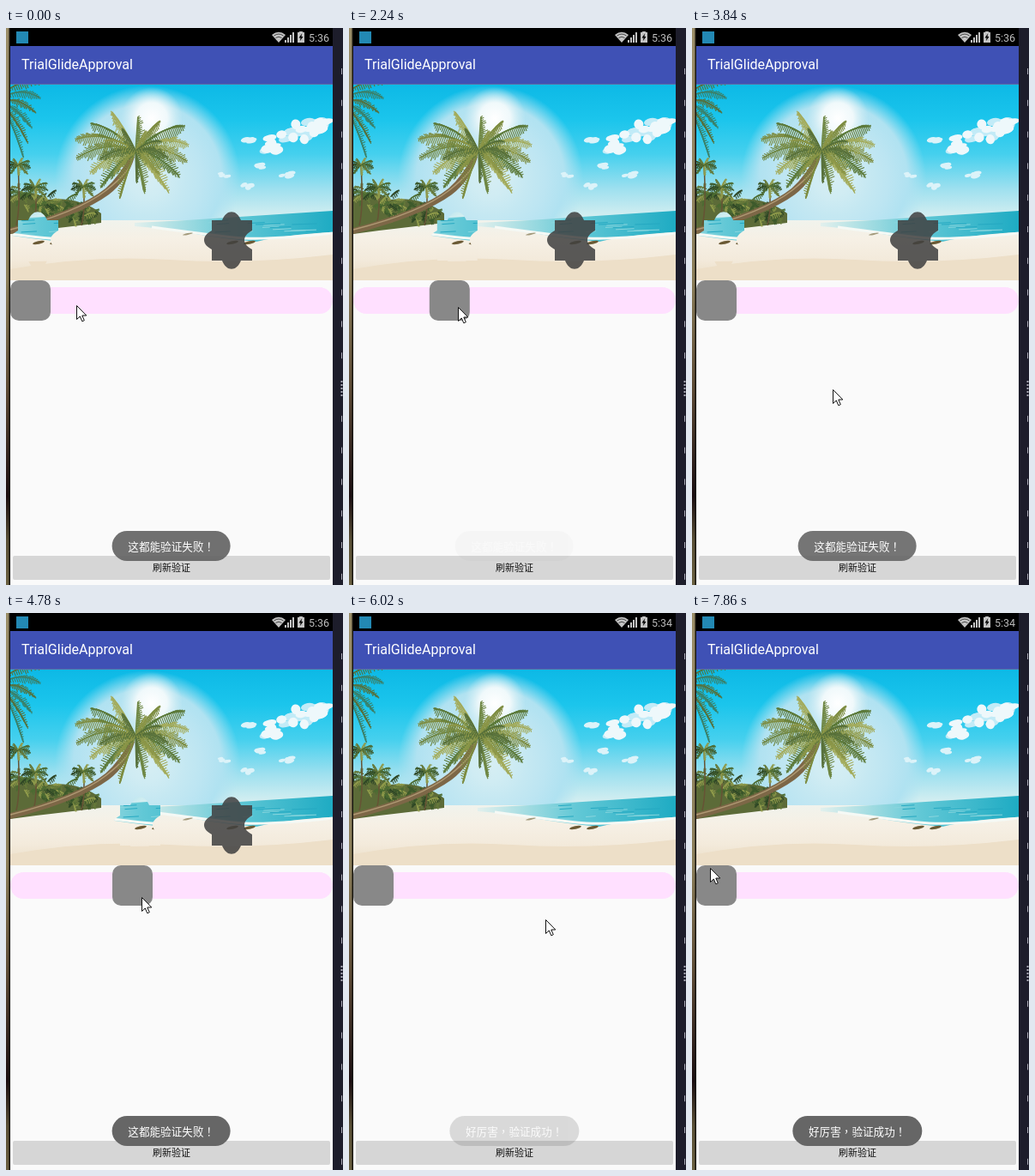
These frames come from a looping animation (393x649 px, 8000 ms). An HTML page with a canvas:

```html
<!DOCTYPE html>
<html lang="zh-CN">
<head>
<meta charset="utf-8">
<title>Slide check</title>
<style>
html, body { margin: 0; width: 100%; height: 100%; overflow: hidden; background: #1d1d2b; }
#stage { position: relative; width: 393px; height: 649px; overflow: hidden; font-family: Roboto, "Noto Sans CJK SC", "Noto Sans CJK", sans-serif; }
#stage > * { position: absolute; }
#edge { left: 0; top: 0; width: 5px; height: 649px; background: linear-gradient(90deg, transparent 3px, #16140f 4px), linear-gradient(#9b8e68, #8b7e59 45%, #5c4a35 65%, #1a0d10 84%, #5a5036 92%, #6a6040); }
#phone { left: 5px; top: 0; width: 376px; height: 649px; background: #fafafa; }
#status { left: 5px; top: 0; width: 376px; height: 21px; background: #000; }
#bar { left: 5px; top: 21px; width: 376px; height: 45px; background: linear-gradient(#3f51b5 44px, #5e6ba5 44px); }
#title { left: 18px; top: 33px; font-size: 16px; line-height: 20px; color: #fff; white-space: nowrap; }
#clock { right: 16px; top: 4px; font-size: 12.5px; line-height: 16px; color: #bdbdbd; }
#app { left: 12px; top: 4px; width: 14px; height: 14px; background: #2389b4; }
#photo { left: 5px; top: 66px; }
#track { left: 5px; top: 302px; width: 376px; height: 31px; border-radius: 15.5px; background: #ffe0ff; }
#knob { left: 5px; top: 294px; width: 47px; height: 47px; border-radius: 10px; background: #888; }
#button { left: 8px; top: 615px; width: 370px; height: 28px; border-radius: 2px; background: #d6d6d6; color: #111; font-size: 11px; line-height: 29px; text-align: center; }
#toast { left: 192.7px; top: 586px; height: 35px; padding: 0 19px; border-radius: 17.5px; background: #666; color: #fff; font-family: "Noto Sans CJK TC", "Noto Sans CJK", sans-serif; font-size: 12.6px; line-height: 36px; white-space: nowrap; transform: translateX(-50%); }
#icons, #margin, #pointer { left: 0; top: 0; }
</style>
</head>
<body>
<div id="stage">
  <div id="edge"></div>
  <div id="phone"></div>
  <div id="status"></div>
  <div id="app"></div>
  <svg id="icons" width="393" height="22" fill="#c4c4c4">
    <path d="M318 17L310 8Q318 1.500 326 8Z"/>
    <path d="M312.500 9Q318 5 323.500 9M314.500 11.500Q318 9 321.500 11.500" fill="none" stroke="#222" stroke-width=".8"/>
    <path d="M325 17V14H327V17ZM328 17V11H330V17ZM331 17V8H333V17ZM334 17V5H336V17Z"/>
    <path d="M340 5H342V4H346V5H348V17H340Z"/>
    <path d="M345 6.500L341.500 11.500H343.500L343 15L346.500 10H344.500Z" fill="#000"/>
  </svg>
  <div id="clock"></div>
  <div id="bar"></div>
  <div id="title">TrialGlideApproval</div>
  <canvas id="photo" width="376" height="228"></canvas>
  <div id="track"></div>
  <div id="knob"></div>
  <div id="button">刷新验证</div>
  <div id="toast" lang="zh-TW"></div>
  <svg id="margin" width="393" height="649"></svg>
  <svg id="pointer" width="16" height="24" viewBox="-1 -1 16 24">
    <path d="M.5 .5V16.500L4.300 13L6.800 18.800L9.300 17.700L6.800 12H11.800Z" fill="#fff" stroke="#111" stroke-width="1"/>
  </svg>
</div>
<script>
const $ = id => document.getElementById(id);
const LOOP = 8000, GOAL = 226;

const clamp = v => Math.max(0, Math.min(1, v));
const mix = (a, b, p) => a + (b - a) * p;
const smooth = p => p * p * (3 - 2 * p);

// Poses take the progress p of a phase and return only what differs from rest.
const glide = (from, bend, to) => p => ({
  at: from.map((v, i) => mix(mix(v, bend[i], p), mix(bend[i], to[i], p), p))
});
const drag = (from, to, a, b) => p => ({
  at: from.map((v, i) => mix(v, to[i], smooth(p))),
  knob: mix(a, b, smooth(p))
});

const approach = glide([80, 324], [14, 328], [42, 320]);
const firstDrag = drag([45, 320], [254, 334], 3, 221);
const wander = glide([261, 335], [302, 561], [38, 325]);
const secondDrag = drag([40, 321], [275, 342], 1, 237);
const leave = glide([250, 313], [240, 365], [160, 419]);
const descend = glide([158, 425], [138, 421], [204, 631]);
const comeBack = glide([150, 530], [85, 410], [21, 298]);
const won = { late: true, solved: true, praise: true };

function success(p) {
  if (p < .5) return { at: [250, 313], knob: GOAL + .7, late: p > 0 };
  return { ...leave(2 * p - 1), ...won, toast: p - .5 };
}

const phases = [
  { start: 0, end: 1, steps: 1, pose: () => ({ at: [82, 324], toast: .93 }) },
  { start: 120, end: 940, steps: 7, pose: approach },
  { start: 1810, end: 2750, steps: 8, pose: p => ({ ...firstDrag(p), toast: clamp(.88 - 2 * p) }) },
  { start: 3180, end: 4140, steps: 8, pose: p => ({ ...wander(p), knob: p ? 0 : 228, toast: clamp(1.25 * p) }) },
  { start: 4270, end: 5170, steps: 7, pose: secondDrag },
  { start: 5330, end: 6290, steps: 8, pose: success },
  { start: 6420, end: 7280, steps: 7, pose: p => ({ ...descend(p), ...won, toast: clamp(.7 + p) }) },
  { start: 7590, end: 7860, steps: 3, pose: p => ({ ...comeBack(p), ...won }) }
];

function stateAt(t) {
  const { start, end, steps, pose } = phases.findLast(f => t >= f.start);
  const last = Math.max(1, steps - 1);
  // Steps vary a little in length, so allow an early switch.
  const step = Math.min(steps - 1, Math.floor((t - start) / (end - start) * last + .2));
  return { knob: 0, toast: 1, ...pose(step / last) };
}

function makePhoto() {
  const canvas = document.createElement("canvas");
  canvas.width = 376;
  canvas.height = 228;
  const c = canvas.getContext("2d");
  c.translate(-5, -66);
  let seed = 7;
  const rnd = (a = 0, b = 1) => mix(a, b, (seed = seed * 16807 % 2147483647) / 2147483647);
  const stops = (g, colors) => {
    colors.forEach((v, i) => g.addColorStop(i / (colors.length - 1), v));
    return g;
  };
  const shade = (x0, y0, x1, y1, ...colors) => stops(c.createLinearGradient(x0, y0, x1, y1), colors);
  const glow = (x, y, r, ...colors) => {
    c.fillStyle = stops(c.createRadialGradient(x, y, 0, x, y, r), colors);
    c.fillRect(x - r, y - r, 2 * r, 2 * r);
  };
  const shape = (d, fill) => { c.fillStyle = fill; c.fill(new Path2D(d)); };
  const line = (d, color, w) => { c.strokeStyle = color; c.lineWidth = w; c.stroke(new Path2D(d)); };
  const oval = (x, y, rx, ry, fill) => {
    c.fillStyle = fill;
    c.beginPath();
    c.ellipse(x, y, rx, ry, -.2, 0, 7);
    c.fill();
  };
  const frond = (x, y, dx, dy, color, leaf) => {
    const cx = x + dx * .5, cy = y + dy * .5 - Math.abs(dx) * .25;
    const n = Math.ceil(Math.hypot(dx, dy) / 2.5), side = Math.sign(dx);
    line(`M${x} ${y}Q${cx} ${cy} ${x + dx} ${y + dy}`, color, 1.5);
    for (let i = 1; i <= n; i++) {
      const t = i / n;
      const px = mix(mix(x, cx, t), mix(cx, x + dx, t), t);
      const py = mix(mix(y, cy, t), mix(cy, y + dy, t), t);
      const len = leaf * Math.sin(.4 + t * 2.5) * rnd(.6, 1.2);
      line(`M${px} ${py}l${side * len * .4} ${len}M${px} ${py}l${side * len * .7} ${-len * .3}`, color, 1.1);
    }
  };
  const crown = (x, y, rx, ry, count, colors, leaf) => {
    for (let i = 0; i < count; i++) {
      const a = i / count * 2 * Math.PI + .15, r = rnd(.8, 1.05);
      frond(x, y, Math.cos(a) * rx * r, Math.sin(a) * ry * r + ry * .1, colors[i % colors.length], leaf);
    }
  };

  // Sky
  c.fillStyle = shade(0, 66, 0, 228, "#0db9e6", "#1bc5ec", "#45d0ee", "#9ee0ef", "#e2f2f1");
  c.fillRect(5, 66, 376, 162);
  glow(165, 175, 108, "#d6eef3", "#d0ecf3", "#c5e8f2", "#bce5f2", "#b0e2f1", "#b0e2f100");
  glow(170, 105, 36, "#fff", "#f0f9fb", "#d6eef300");

  // Clouds
  for (let i = 0; i < 40; i++) {
    const t = rnd(), spread = 16 * Math.sin(Math.PI * (.15 + t * .8));
    oval(mix(302, 374, t), mix(138, 110, t) + rnd(-spread, spread) * .8, rnd(5, 10), rnd(3, 6), i < 18 ? "#c2ebf7" : "#eef8fb");
  }
  for (const [x, y] of [[284, 131], [295, 161], [326, 171], [256, 171], [278, 184]]) {
    for (let i = 0; i < 4; i++) oval(x + rnd(-7, 7), y + rnd(-2, 2), rnd(3, 6), rnd(1.5, 3), "#dcf3f9");
  }

  // Beach and sea
  c.fillStyle = shade(0, 222, 0, 294, "#f0f3ed", "#f6f0e5", "#f3eadb", "#eadcc4");
  c.fillRect(5, 224, 376, 70);
  shape("M5 281Q100 264 190 270T381 264V294H5Z", "#eddfc8");
  shape("M150 227L210 224L381 213V238Q330 240 292 249Q250 245 215 239Q180 233 150 231Z", shade(150, 0, 381, 0, "#e2f0ed", "#62c8d6", "#1eabc3"));
  for (let i = 0; i < 14; i++) {
    const y = rnd(222, 238), x = rnd(235, 350);
    line(`M${x} ${y}l${rnd(10, 30)} -1`, i % 2 ? "#8ad6de" : "#25a9c2", 1);
  }
  line("M170 232Q230 240 265 244T381 239", "#f5f9f5", 3);
  for (const x of [264, 284]) oval(x, 250, 7, 1.8, "#6b5a35");
  oval(212, 240, 6, 1, "#a39a7c");

  // Grove
  const grove = ["#3d5a2c", "#65793a", "#8f9a4b", "#4d6c33", "#2f4726"];
  shape("M5 196Q30 186 48 200Q85 196 111 216V227Q70 232 35 236L5 240Z", "#5c6b38");
  for (let i = 0; i < 70; i++) {
    const x = rnd(5, 105);
    frond(x, mix(182, 208, x / 105) + rnd(0, 22), rnd(-14, 14), rnd(-8, 10), grove[i % 5], 5);
  }
  for (const [x, y] of [[14, 160], [34, 186], [90, 185]]) {
    line(`M${x} ${y}Q${x + 3} 210 ${x - 2} 230`, "#665335", 1.5);
    crown(x, y, 17, 12, 9, grove, 5);
  }
  for (let i = 0; i < 6; i++) frond(2, 72 + i * 6, mix(42, 18, i / 5), mix(-8, 48, i / 5), i % 2 ? "#3b8069" : "#55713d", 7);

  // Palm
  shape("M5 233Q85 212 116 187Q134 171 145 147L150 150Q142 177 120 194Q86 219 5 240Z", "#7d6747");
  line("M5 235Q84 215 117 189T146 151", "#b09a74", 1.5);
  crown(151, 143, 72, 52, 15, ["#7d8c40", "#5c7a3a", "#a3ab5a", "#6f8744"], 14);
  crown(151, 143, 42, 32, 9, ["#57703a", "#8b9648"], 9);
  return canvas;
}

const photo = makePhoto();
const ctx = $("photo").getContext("2d");
const gap = new Path2D("M240 224H252C257 211 269 211 274 224H287V236C275 242 275 252 287 258V271H274C269 284 257 284 252 271H240V258C228 252 228 242 240 236Z");

function drawPhoto({ knob, solved }) {
  ctx.setTransform(1, 0, 0, 1, 0, 0);
  ctx.drawImage(photo, 0, 0);
  if (solved) return;
  ctx.translate(-5, -66);
  ctx.fillStyle = "rgba(65,65,65,.86)";
  ctx.fill(gap);
  ctx.save();
  ctx.translate(knob - GOAL, 0);
  ctx.clip(gap);
  ctx.drawImage(photo, 5, 66);
  ctx.restore();
}

// Slivers of a page behind the phone window.
for (let i = 0; i < 17; i++) {
  const y = 51 + i * 36.8;
  const dots = i === 10 ? 'stroke-dasharray="2 2" stroke-width="2"' : "";
  $("margin").innerHTML += `<path d="M391.500 ${y - (dots ? 8 : 4)}v${dots ? 20 : 7}" stroke="#a9a9b5" ${dots}/>`;
}

function show(t) {
  const s = stateAt(t);
  const [x, y] = s.at.map(Math.round);
  drawPhoto(s);
  $("knob").style.transform = `translateX(${s.knob}px)`;
  $("pointer").style.transform = `translate(${x - 1}px, ${y - 2}px)`;
  $("clock").textContent = s.late ? "5:34" : "5:36";
  $("toast").textContent = s.praise ? "好厉害，验证成功！" : "这都能验证失败！";
  $("toast").style.opacity = s.toast;
}

const begin = performance.now();
function tick() {
  show((performance.now() - begin) % LOOP);
  requestAnimationFrame(tick);
}
tick();
</script>
</body>
</html>
```
